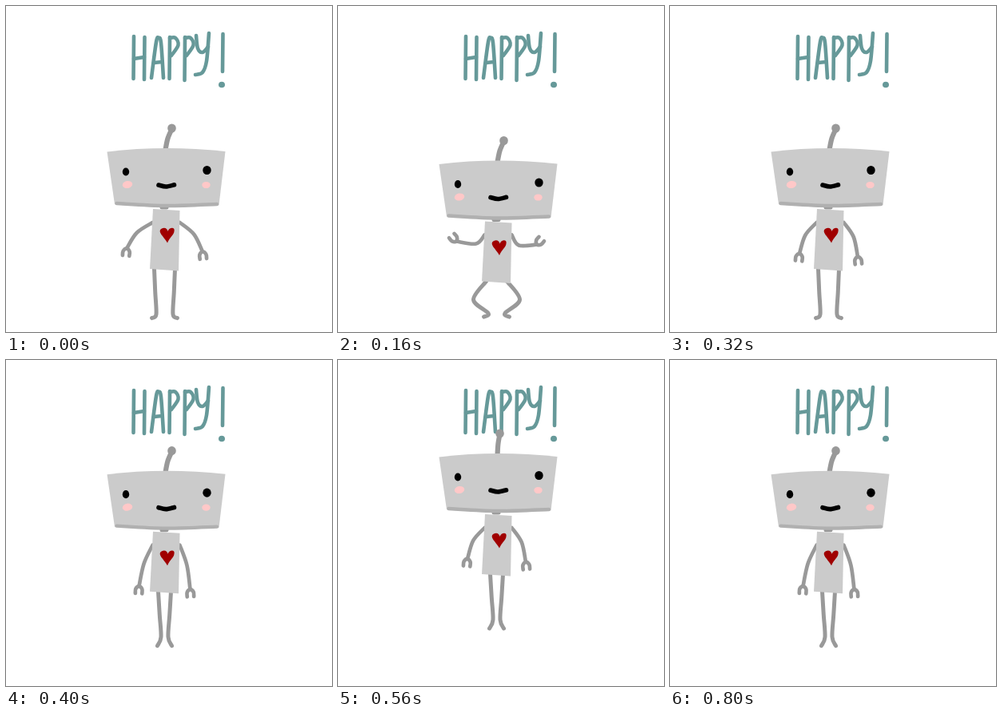
An HTML page with a canvas that plays this animation: 408 by 408 pixels, repeating every 0.88 s.

```html
<!DOCTYPE html>
<html lang="en">
<head>
<meta charset="utf-8">
<title>Happy robot</title>
<style>
  html, body { margin: 0; width: 100%; height: 100%; overflow: hidden; background: #fff; }
  canvas { display: block; width: 408px; height: 408px; }
</style>
</head>
<body>
<canvas id="stage" width="408" height="408"></canvas>
<script>
const ctx = document.getElementById("stage").getContext("2d");
const STEP = 80, STEPS = 11, LANDED = 4;
const LIMB = "#999", METAL = "#cbcbcb", SHADE = "#b0b0b0", TEAL = "#669999", BLUSH = "#ffc8c8";

// Wrist distance from the middle, wrist height, bulge of the elbow, turn of the claw.
const ARMS = {
  out: { spread: 47.5, y: 305.5, bow: 5, turn: 0.1 },
  up: { spread: 50.5, y: 281, bow: -10, turn: 2.45 },
  down: { spread: 36.5, y: 312, bow: 5, turn: 0.1 },
  long: { spread: 32, y: 324.5, bow: 3.5, turn: 0.05 }
};

const mix = (a, b, k) => a + (b - a) * k;
const mixAll = (a, b, k) =>
  Object.fromEntries(Object.keys(a).map(key => [key, mix(a[key], b[key], k)]));

// Smooth curve through all points.
function stroke(points, color, width) {
  const at = i => points[Math.max(0, Math.min(points.length - 1, i))];
  ctx.beginPath();
  ctx.moveTo(...points[0]);
  for (let i = 0; i < points.length - 1; i++) {
    const [p, a, b, n] = [at(i - 1), at(i), at(i + 1), at(i + 2)];
    ctx.bezierCurveTo(a[0] + (b[0] - p[0]) / 6, a[1] + (b[1] - p[1]) / 6,
      b[0] - (n[0] - a[0]) / 6, b[1] - (n[1] - a[1]) / 6, b[0], b[1]);
  }
  ctx.strokeStyle = color;
  ctx.lineWidth = width;
  ctx.stroke();
}

function oval(x, y, rx, ry, color, tilt = 0) {
  ctx.beginPath();
  ctx.ellipse(x, y, rx, ry, tilt, 0, Math.PI * 2);
  ctx.fillStyle = color;
  ctx.fill();
}

function shape(path, color) {
  ctx.fillStyle = color;
  ctx.fill(new Path2D(path));
}

function drawWord() {
  const pen = (...points) => stroke(points, TEAL, 4.6);
  const stem = (x, top, bottom) => pen([x, top], [x - 0.5, bottom]);
  const letterP = (x, bottom) => {
    stem(x, 39, bottom);
    pen([x, 40], [x + 7, 40], [x + 10.5, 49], [x + 2, 62]);
  };
  stem(160, 38, 91);
  stem(173.5, 39, 92);
  pen([160, 66], [173, 64]);
  pen([182, 90], [188, 45], [191, 40], [194, 46], [197, 90]);
  pen([185, 71], [195, 70]);
  letterP(205, 91);
  letterP(224, 93);
  pen([238, 37], [240, 53], [246, 58], [253, 51]);
  pen([254, 34], [251, 69], [246, 83], [237, 86]);
  stem(271.5, 35, 82);
  oval(270, 98.5, 4, 3.8, TEAL);
}

function drawArm(side, { spread, y, bow, turn }) {
  const shoulder = [200.5 + side * 17, 271];
  const wrist = [198.5 + side * spread, y + side * 2];
  const elbow = [mix(shoulder[0], wrist[0], 0.5) + side * bow * 0.7,
    mix(shoulder[1], wrist[1], 0.5) - bow * 0.7];
  stroke([shoulder, elbow, wrist], LIMB, 4.7);
  ctx.save();
  ctx.translate(...wrist);
  ctx.rotate(-side * turn);
  stroke([[-4.2, 9], [-4, 3.5], [0, 0], [4, 3.5], [4.2, 9]], LIMB, 4.7);
  ctx.restore();
}

function drawLeg(side, dip, flying) {
  const [hip, ankle, toe, drop] = flying ? [8, 4.5, 9, 11] : [13, 10.5, 16, 4.5];
  const x = spread => 198.5 + side * spread;
  const ankleY = mix(386, 369, dip);
  stroke([[x(hip), 329], [x(mix((hip + ankle) / 2, 29, dip)), mix(358, 352, dip)],
    [x(ankle), ankleY], [x(toe), ankleY + drop]], LIMB, 5);
}

function drawBody() {
  stroke([[195, 252], [201, 252]], LIMB, 5);
  shape("M184 254 L217.5 256 L216 331.5 L180 329 Z", METAL);
  shape("M202 296.5 C199 290 188 282 195 278.5 C199 276.5 202 279 202.5 282" +
    " C204 277 212 276 210.5 282 C210 287 205 289 202 296.5 Z", "#a00000");
}

function drawHead(ball) {
  stroke([[199.5, 180], [mix(199, ball, 0.4), 166], [ball, 154]], LIMB, 6.2);
  oval(ball, 153, 5.3, 5.6, LIMB);
  shape("M126.5 182.5 Q198 174 274.5 182 L266.5 249 Q200 254 136 248 Z", METAL);
  stroke([[138.5, 247], [200, 250], [264, 248]], SHADE, 4.4);
  oval(150, 207.5, 4.2, 5.1, "#000");
  oval(251.5, 205.5, 5.2, 5.6, "#000");
  oval(152, 223.5, 6.3, 4.5, BLUSH, -0.2);
  oval(250.5, 224, 5.2, 4.1, BLUSH);
  stroke([[191, 224], [200, 226], [210.5, 223.8]], "#000", 5.6);
}

function draw(time) {
  const step = Math.floor(time / STEP) % STEPS;
  const flying = step > LANDED;
  const fromPeak = Math.abs(step - 7.5);
  const stretched = flying && fromPeak > 2;
  const dip = flying ? 0 : Math.sin(Math.PI * step / LANDED) ** 2;
  const lift = flying ? 61.3 - 1.85 * fromPeak ** 2.7 : 0;
  const rest = stretched ? ARMS.long : step < LANDED ? ARMS.out : ARMS.down;
  const arms = mixAll(rest, ARMS.up, dip);

  ctx.fillStyle = "#fff";
  ctx.fillRect(0, 0, 408, 408);
  ctx.lineCap = ctx.lineJoin = "round";
  drawWord();
  ctx.save();
  ctx.translate(0, 15.5 * dip - lift);
  for (const side of [-1, 1]) {
    drawLeg(side, dip, flying);
    drawArm(side, arms);
  }
  drawBody();
  drawHead(flying && !stretched ? 202.5 : 207.5);
  ctx.restore();
}

let start;
function tick(now) {
  start ??= now;
  draw(now - start);
  requestAnimationFrame(tick);
}
draw(0);
requestAnimationFrame(tick);
</script>
</body>
</html>
```
